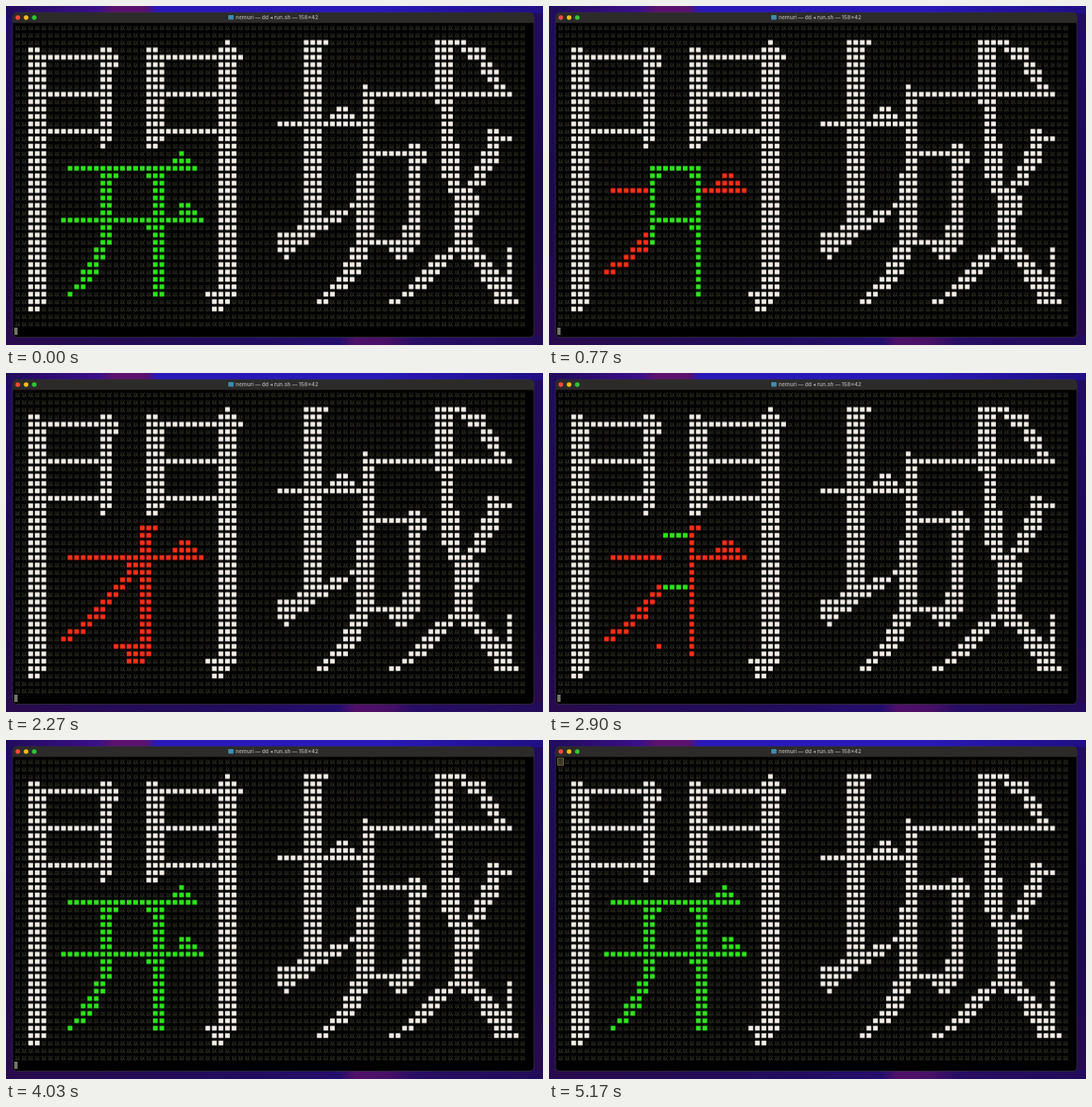
Animation of 650x410 px, one loop 5210 ms. Source, as an HTML page without scripts:

```html
<!DOCTYPE html>
<html lang="ja">
<head>
<meta charset="utf-8">
<title>Gate</title>
<style>
html, body { margin: 0; width: 100%; height: 100%; overflow: hidden; background: #1c0a48; }
svg { display: block; width: 650px; height: 410px; }
.title { font: 600 6.5px Inter, "DejaVu Sans", sans-serif; fill: #a6a5a0; }
.dim { font: 6.6px "Noto Sans CJK JP", "Noto Sans CJK", sans-serif; fill: #55533e; }
.cells path { fill: none; stroke-width: 1; }
.cells .w2 { stroke-width: 2; }
.cells .w3 { stroke-width: 3; }
.cream { stroke: url(#cream); }
.green { stroke: url(#green); }
.red { stroke: url(#red); }

/* the green sign closes and opens one column per side every 104 ms */
.gate { transform-origin: 18px 0; animation: gate 5.21s infinite; }
@keyframes gate {
  0% { transform: scaleX(1); animation-timing-function: steps(11, end); }
  21.96% { transform: scaleX(0); }
  50% { transform: scaleX(0); animation-timing-function: steps(11, end); }
  71.96%, 100% { transform: scaleX(1); }
}
.low { animation: low 5.21s step-end infinite; }
.home { opacity: 0; animation: home 5.21s step-end infinite; }
@keyframes low { 0% { opacity: 1; } 99.2%, 100% { opacity: 0; } }
@keyframes home { 0% { opacity: 0; } 99.2%, 100% { opacity: 1; } }
</style>
</head>
<body>
<svg viewBox="0 0 650 410">
  <defs>
    <linearGradient id="top">
      <stop offset="0" stop-color="#200c5c"/>
      <stop offset=".17" stop-color="#3a1088"/>
      <stop offset=".2" stop-color="#5a126c"/>
      <stop offset=".26" stop-color="#5a126c"/>
      <stop offset=".28" stop-color="#2a18b8"/>
      <stop offset=".7" stop-color="#2a18b8"/>
      <stop offset="1" stop-color="#200f84"/>
    </linearGradient>
    <linearGradient id="side" x2="0" y2="1">
      <stop offset="0" stop-color="#200c62"/>
      <stop offset=".6" stop-color="#1b0a4c"/>
      <stop offset="1" stop-color="#280b4c"/>
    </linearGradient>
    <linearGradient id="bottom">
      <stop offset="0" stop-color="#280b4c"/>
      <stop offset=".4" stop-color="#220c5c"/>
      <stop offset=".62" stop-color="#240e6c"/>
      <stop offset=".65" stop-color="#50106a"/>
      <stop offset=".71" stop-color="#481066"/>
      <stop offset=".76" stop-color="#280d64"/>
      <stop offset="1" stop-color="#220c58"/>
    </linearGradient>

    <pattern id="dim" patternUnits="userSpaceOnUse" x="10.03" y="21.72" width="7.94" height="8.955">
      <rect width="7.94" height="8.955"/>
      <text class="dim" x=".7" y="6.9">以</text>
    </pattern>
    <pattern id="cream" patternUnits="userSpaceOnUse" y="-.5" width="1" height="1">
      <rect width="1" height="1"/><rect x=".14" y=".18" width=".72" height=".64" fill="#f3efe8"/>
    </pattern>
    <pattern id="green" patternUnits="userSpaceOnUse" y="-.5" width="1" height="1">
      <rect width="1" height="1"/><rect x=".14" y=".18" width=".72" height=".64" fill="#2fe51c"/>
    </pattern>
    <pattern id="red" patternUnits="userSpaceOnUse" y="-.5" width="1" height="1">
      <rect width="1" height="1"/><rect x=".14" y=".18" width=".72" height=".64" fill="#fb3018"/>
    </pattern>

    <clipPath id="gap" transform="translate(10.03 26.2) scale(7.94 8.955)">
      <rect class="gate" x="7" y="16.5" width="22" height="21"/>
    </clipPath>
  </defs>

  <!-- desktop -->
  <rect width="650" height="410" fill="url(#side)"/>
  <rect width="650" height="9" fill="url(#top)"/>
  <rect y="399" width="650" height="11" fill="url(#bottom)"/>

  <!-- window -->
  <rect x="8" y="8" width="631" height="392.5" rx="5" stroke="#34333a" stroke-width=".8"/>
  <path d="M8 20.5V13Q8 8 13 8H634Q639 8 639 13V20.5z" fill="#2c2b2a"/>
  <circle cx="14.3" cy="14" r="2.8" fill="#fb4a3a"/>
  <circle cx="24.3" cy="14" r="2.8" fill="#fbba18"/>
  <circle cx="34.2" cy="14" r="2.8" fill="#2fc732"/>
  <rect x="269" y="11" width="6.5" height="5.5" rx="1" fill="#3f8cae"/>
  <text class="title" x="278" y="16.3">nemuri — dd ◂ run.sh — 158×42</text>

  <rect x="10.03" y="21.72" width="619.3" height="367.1" fill="url(#dim)"/>

  <!-- one unit is one cell; whole y values are row centres -->
  <g class="cells" transform="translate(10.03 26.2) scale(7.94 8.955)">
    <g class="cream">
      <!-- gate -->
      <path class="w3" d="M3.5 3.5v34M21.5 3.5v12M32.5 2.5v33"/>
      <path class="w2" d="M14 2.5v13M21 2.5v14"/>
      <path d="M2 3h2M2 38h2M5 4h11M5 9h8M5 14h8M15 5h1M13 16h1"/>
      <path d="M22 4h13M22 9h9M22 14h9M32 2h1M29 36h5M30 37h3M30 38h2"/>
      <!-- left part -->
      <path class="w3" d="M45.5 1.5v25"/>
      <path d="M47 2h1M49 11h2M48 12h4M40 13h15"/>
      <path d="M51 24h2M48 25h3M45 26h5M43 27h5M40 28h6M40 29h5M40 30h3M41 31h1"/>
      <!-- middle part -->
      <path class="w2" d="M54 8.5v11M61 15.5v13"/>
      <path class="w3" d="M53.5 19.5v9"/>
      <path d="M53 8h1M55 9h21M52 29h3M51 30h3M51 31h3M50 32h3M50 33h3M49 34h3M48 35h3M47 36h2M46 37h2"/>
      <path d="M55 17h8M62 18h1M59 27h1M59 28h1M55 29h7M57 30h4M58 31h2"/>
      <!-- right part -->
      <path class="w3" d="M65.5 1.5v9M66.5 15.5v5M68.5 25.5v4"/>
      <path class="w2" d="M66 10.5v5M67 20.5v2"/>
      <path d="M67 2h2M68 3h4M69 4h3M71 5h2M71 6h3M72 7h2M73 8h2"/>
      <path d="M72 14h2M72 15h4M72 16h2M71 17h3M71 18h3M70 19h3M70 20h2M69 21h3M68 22h2M67 23h4M67 24h4M67 25h4"/>
      <path d="M66 30h5M64 31h3M63 32h3M62 33h3M61 34h3M60 35h3M59 36h2M57 37h2"/>
      <path d="M68 31h4M70 32h3M71 33h3M71 34h4M72 35h3M73 36h2M73 37h4M75.5 29.5v7"/>
    </g>
    <g class="red">
      <path class="w2" d="M20 17.5v18"/>
      <path d="M21 18h1M25 20h2M24 21h4M8 22h21M15 34h6M17 35h4M17 36h3"/>
      <path d="M17 23h2M17 24h2M16 25h2M15 26h2M14 27h2M13 28h2M12 29h2M11 30h3M10 31h2M8 32h3M7 33h2"/>
    </g>
  </g>

  <g clip-path="url(#gap)">
    <rect x="65" y="173" width="176" height="190" fill="url(#dim)"/>
    <g class="cells green" transform="translate(10.03 26.2) scale(7.94 8.955)">
      <path class="w2" d="M14 18.5v11M22 18.5v18"/>
      <path d="M25 17h1M24 18h3M8 19h20M15 20h1M20 20h1M25 24h2M25 25h3M7 26h22M20 27h1"/>
      <path d="M12 30h2M12 31h2M11 32h2M10 33h3M10 34h2M9 35h2M8 36h1"/>
    </g>
  </g>

  <!-- cursor -->
  <rect class="low" x="10" y="389" width="4" height="8.8" fill="#73736a"/>
  <rect class="home" x="10.4" y="22" width="7.2" height="8.4" fill="#8a8458" fill-opacity=".3" stroke="#86804c" stroke-width=".8"/>
</svg>
</body>
</html>
```
